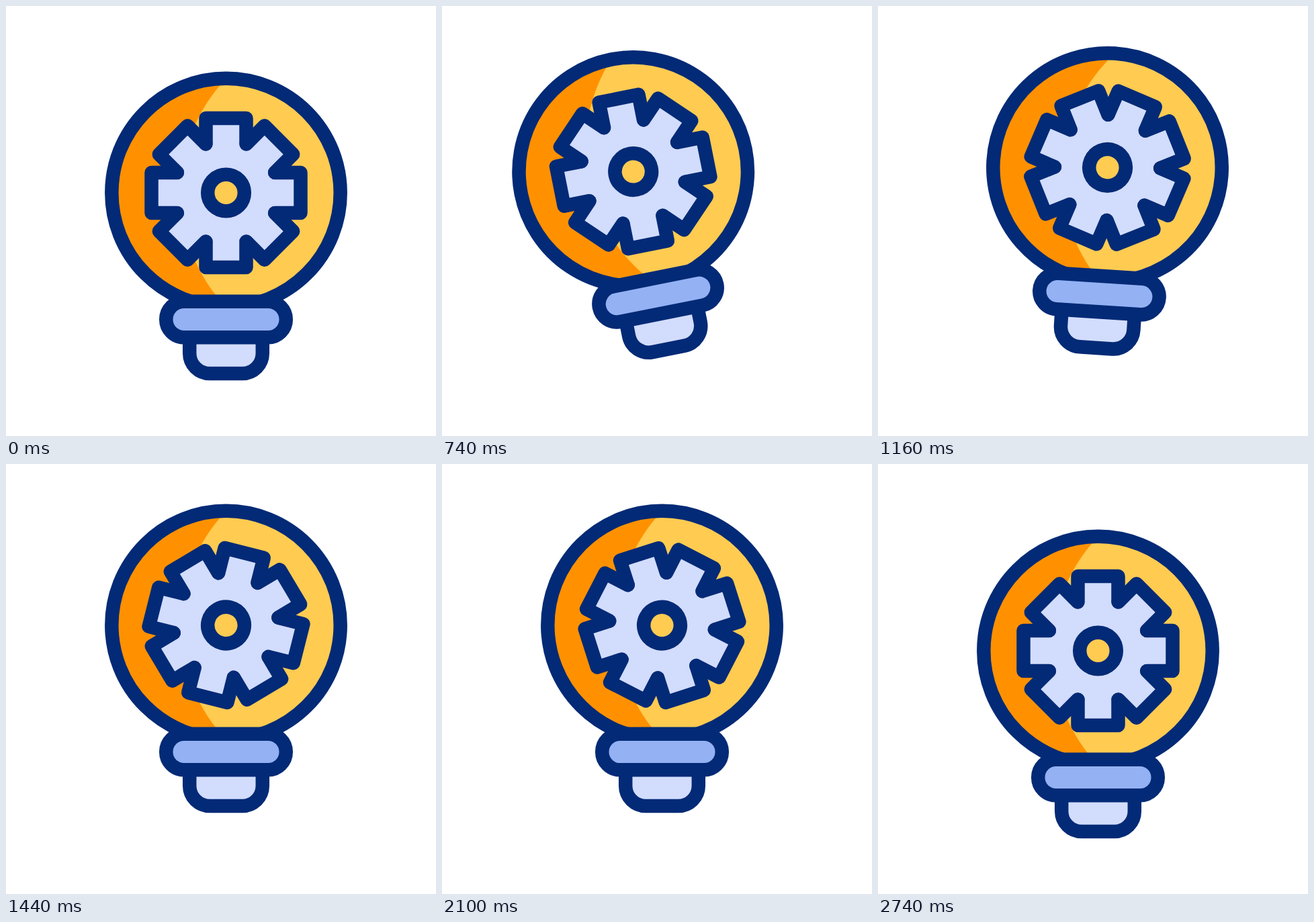
An HTML page without scripts that plays this animation: 640x640 px, repeating every 2920 ms.

```html
<!DOCTYPE html>
<html lang="en">
<head>
<meta charset="utf-8">
<title>Idea bulb</title>
<style>
  html, body { margin: 0; width: 100%; height: 100%; overflow: hidden; background: #fff; }
  svg { display: block; width: 100%; height: 100%; }

  .line { stroke: #032a76; stroke-width: 20.5; stroke-linecap: round; stroke-linejoin: round; }
  .none { fill: none; }
  .yellow { fill: #ffcb51; }
  .orange { fill: #ff9100; }
  .pale { fill: #d2dcfd; }
  .blue { fill: #93b1f3; }

  .bulb, .gear {
    animation: 2920ms cubic-bezier(.333, 0, .667, 1) infinite;
  }
  .bulb {
    transform-origin: 327.5px 497px;
    animation-name: lift, sway;
  }
  .gear {
    transform-origin: 0 0;
    animation-name: spin, swell;
  }

  @keyframes lift {
    0%, 6.99% { translate: 0 0; }
    28.63%, 71.4% { translate: 0 -38px; }
    93.22%, 100% { translate: 0 0; }
  }
  @keyframes sway {
    0%, 6.99% { rotate: 0deg; }
    28.63% { rotate: -12deg; }
    36.5% { rotate: 6deg; }
    44.18%, 100% { rotate: 0deg; }
  }
  @keyframes spin {
    0%, 28.8% { rotate: 0deg; }
    82.36%, 100% { rotate: 180deg; }
  }
  @keyframes swell {
    0%, 49.66% { scale: 1; }
    60.62% { scale: 1.4; }
    71.58%, 100% { scale: 1; }
  }
</style>
</head>
<body>
<svg viewBox="0 0 640 640">
  <defs>
    <path id="tooth" d="M-30-72.7V-111H30V-72.7"/>
    <g id="pair">
      <use href="#tooth"/>
      <use href="#tooth" transform="rotate(45)"/>
    </g>
  </defs>

  <g class="bulb">
    <!-- glass -->
    <circle class="orange" cx="327.5" cy="278" r="170"/>
    <path class="yellow" d="M327.5 108A247 247 0 0 0 327.5 448A170 170 0 0 0 327.5 108"/>
    <circle class="line none" cx="327.5" cy="278" r="170.2"/>

    <!-- socket -->
    <path class="line pale" d="M273.2 493V517a30 30 0 0 0 30 30H351.8a30 30 0 0 0 30-30V493"/>
    <rect class="line blue" x="238.2" y="439.7" width="178.6" height="53.6" rx="26.8"/>

    <g transform="translate(327.5 278)">
      <g class="gear">
        <circle class="pale" r="78"/>
        <g class="line pale">
          <use href="#pair"/>
          <use href="#pair" transform="rotate(90)"/>
          <use href="#pair" transform="rotate(180)"/>
          <use href="#pair" transform="rotate(270)"/>
        </g>
        <circle class="line yellow" r="27.3"/>
      </g>
    </g>
  </g>
</svg>
</body>
</html>
```
